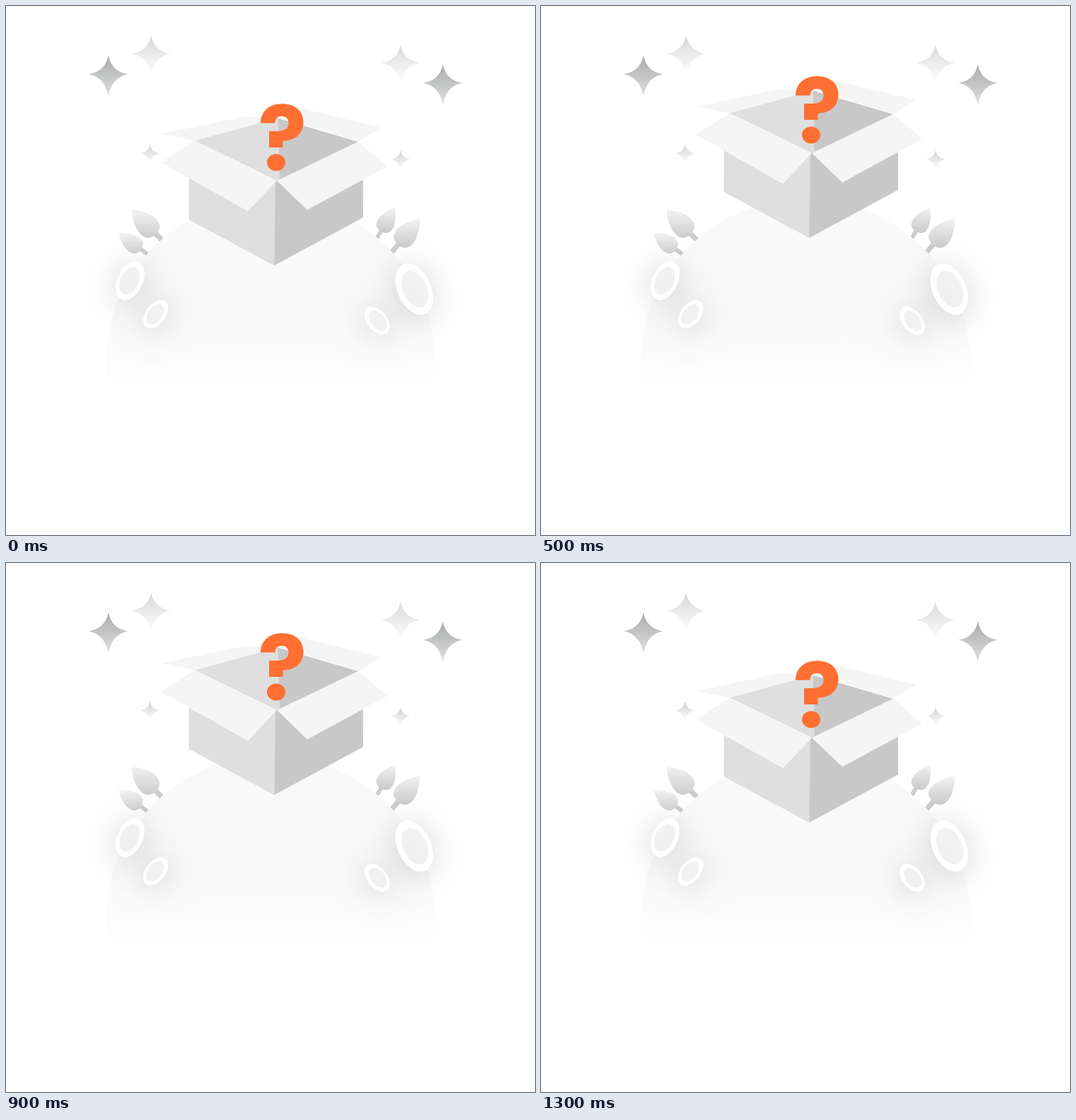
These frames come from a looping animation (748 px wide and 748 px high, 1500 ms). An HTML page with a canvas:

```html
<!DOCTYPE html>
<html lang="en">
<head>
<meta charset="utf-8">
<title>Mystery box</title>
<style>
html, body { margin: 0; width: 100%; height: 100%; overflow: hidden; background: #fff; }
canvas { display: block; }
</style>
</head>
<body>
<canvas id="stage" width="748" height="748"></canvas>
<script>
const SIZE = 748, MID = 374, LOOP = 1500, STEP = 100, RISE = 9.72;
const ORANGE = '#ff6f31', LIGHT = '#dfdfdf', DARK = '#c8c8c8', FLAP = '#f5f5f5';
const ctx = document.getElementById('stage').getContext('2d');

function fade(y0, y1, top, bottom) {
  const g = ctx.createLinearGradient(0, y0, 0, y1);
  g.addColorStop(0, top);
  g.addColorStop(1, bottom);
  return g;
}

function poly(c, color, ...pts) {
  c.beginPath();
  pts.forEach(p => c.lineTo(...p));
  c.fillStyle = color;
  c.fill();
}

function oval(c, x, y, rx, ry, deg, color) {
  c.beginPath();
  c.ellipse(x, y, rx, ry, deg * Math.PI / 180, 0, Math.PI * 2);
  c.fillStyle = color;
  c.fill();
}

// Four-pointed sparkle with concave sides and a longer lower arm
function sparkle(c, x, y, w, top, bottom) {
  const arms = [[0, -w * 0.96], [w, 0], [0, w * 1.14], [-w, 0]];
  c.beginPath();
  c.moveTo(x, y + arms[0][1]);
  arms.forEach(([ax, ay], i) => {
    const [bx, by] = arms[(i + 1) % 4];
    const near = 0.11, far = 0.43;
    c.bezierCurveTo(
      x + ax * far + bx * near, y + ay * far + by * near,
      x + ax * near + bx * far, y + ay * near + by * far,
      x + bx, y + by);
  });
  c.fillStyle = fade(y - w, y + w * 1.1, top, bottom);
  c.fill();
}

// Unit leaf along the x axis, tip at the origin
const leafShape = new Path2D(
  'M0 0C.35 .3 .74 .4 .92 .23Q1 .12 1 0Q1 -.12 .92 -.23C.74 -.4 .35 -.3 0 0Z');
const stemShape = new Path2D('M.9 -.075H1.32V.075H.9Z');

function leaf(c, x, y, deg, len) {
  const m = new DOMMatrix().translate(x, y).rotate(deg).scale(len);
  const place = shape => {
    const p = new Path2D();
    p.addPath(shape, m);
    return p;
  };
  c.fillStyle = '#cdcdcd';
  c.fill(place(stemShape));
  c.fillStyle = fade(y, y + len * 0.85, '#f2f2f2', '#cbcbcb');
  c.fill(place(leafShape));
}

function crater(c, x, y, r, deg) {
  const flat = 0.62, inner = 0.71;
  c.save();
  c.shadowColor = 'rgba(0,0,0,0.17)';
  c.shadowBlur = 42;
  c.shadowOffsetY = 4;
  oval(c, x, y, r * flat, r, deg, '#fff');
  c.restore();
  oval(c, x + Math.sign(x - MID), y, r * flat * inner, r * inner, deg, '#f1f1f1');
}

function drawScene(c) {
  c.fillStyle = '#fff';
  c.fillRect(0, 0, SIZE, SIZE);

  sparkle(c, 144.8, 96.4, 27.5, '#a8abaa', '#dedede');
  sparkle(c, 617.7, 108.8, 27.5, '#a8abaa', '#dedede');
  sparkle(c, 205.2, 67.5, 27, '#d5d6d6', '#ffffff');
  sparkle(c, 557.8, 80.4, 27, '#dadada', '#ffffff');
  sparkle(c, 203.7, 208.4, 13.5, '#d0d0d0', '#ffffff');
  sparkle(c, 558, 216.6, 13.5, '#d0d0d0', '#ffffff');

  leaf(c, 177.5, 288, 45, 49);
  leaf(c, 159.5, 321.5, 36, 39);
  leaf(c, 550, 285.5, 121, 39);
  leaf(c, 585, 301, 130, 48);

  oval(c, MID, 506, 233, 233.6, 0, '#fff');
  c.save();
  c.beginPath();
  c.rect(0, 0, SIZE, 556);
  c.clip();
  oval(c, MID, 506, 233, 233.6, 0, fade(440, 556, '#f9f9f9', '#ffffff'));
  c.restore();

  crater(c, 175.5, 388.5, 29.1, 25);
  crater(c, 211.7, 436, 22.7, 37);
  crater(c, 577.2, 400.3, 38.4, -24);
  crater(c, 524.8, 445, 22.7, -38);
}

// Rim corners, then the lower corners
const left = [267, 190.5], back = [384.3, 158.5], right = [498, 192], front = [383, 247];
const lowLeft = [258.6, 302], lowRight = [505, 299], low = [379.2, 367];

const mark = new Path2D(
  'M360 165.5C360 149 372.5 138.2 390 138.2C408.5 138.2 420.5 148.5 420.5 164' +
  'C420.5 180 410 190 391.5 190.8V200H372V177H384C394 177 399.5 173 399.5 165.5' +
  'C399.5 159.5 396 155.8 390 155.8C384.3 155.8 380.5 159.5 380.5 165.5Z');

function drawBox(c) {
  poly(c, FLAP, left, [219, 181], [337, 156.3], back);
  poly(c, FLAP, [386, 157.3], [411, 143], [530.5, 172], [498.5, 191.5]);
  poly(c, LIGHT, left, back, [387, 247], front);
  poly(c, DARK, back, right, [386.7, 246]);
  poly(c, LIGHT, [258.8, 240], [381.5, 246], low, lowLeft);
  poly(c, DARK, [381, 246], [504.8, 243], lowRight, low);
  poly(c, FLAP, left, front, [342, 290.3], [219, 221]);
  poly(c, FLAP, right, front, [426, 288.3], [539.3, 227]);

  c.fillStyle = ORANGE;
  c.fill(mark);
  oval(c, 382, 221.3, 13, 12, 0, ORANGE);
}

// The scene is static, so paint it once
const scene = document.createElement('canvas');
scene.width = scene.height = SIZE;
drawScene(scene.getContext('2d'));

function render(now) {
  const tick = Math.floor((now % LOOP) / STEP);
  const lift = Math.max(0, Math.min(tick - 1, 13 - tick));
  ctx.drawImage(scene, 0, 0);
  ctx.save();
  ctx.translate(0, -lift * RISE);
  drawBox(ctx);
  ctx.restore();
}

const start = performance.now();
function loop() {
  render(performance.now() - start);
  requestAnimationFrame(loop);
}
loop();
</script>
</body>
</html>
```
